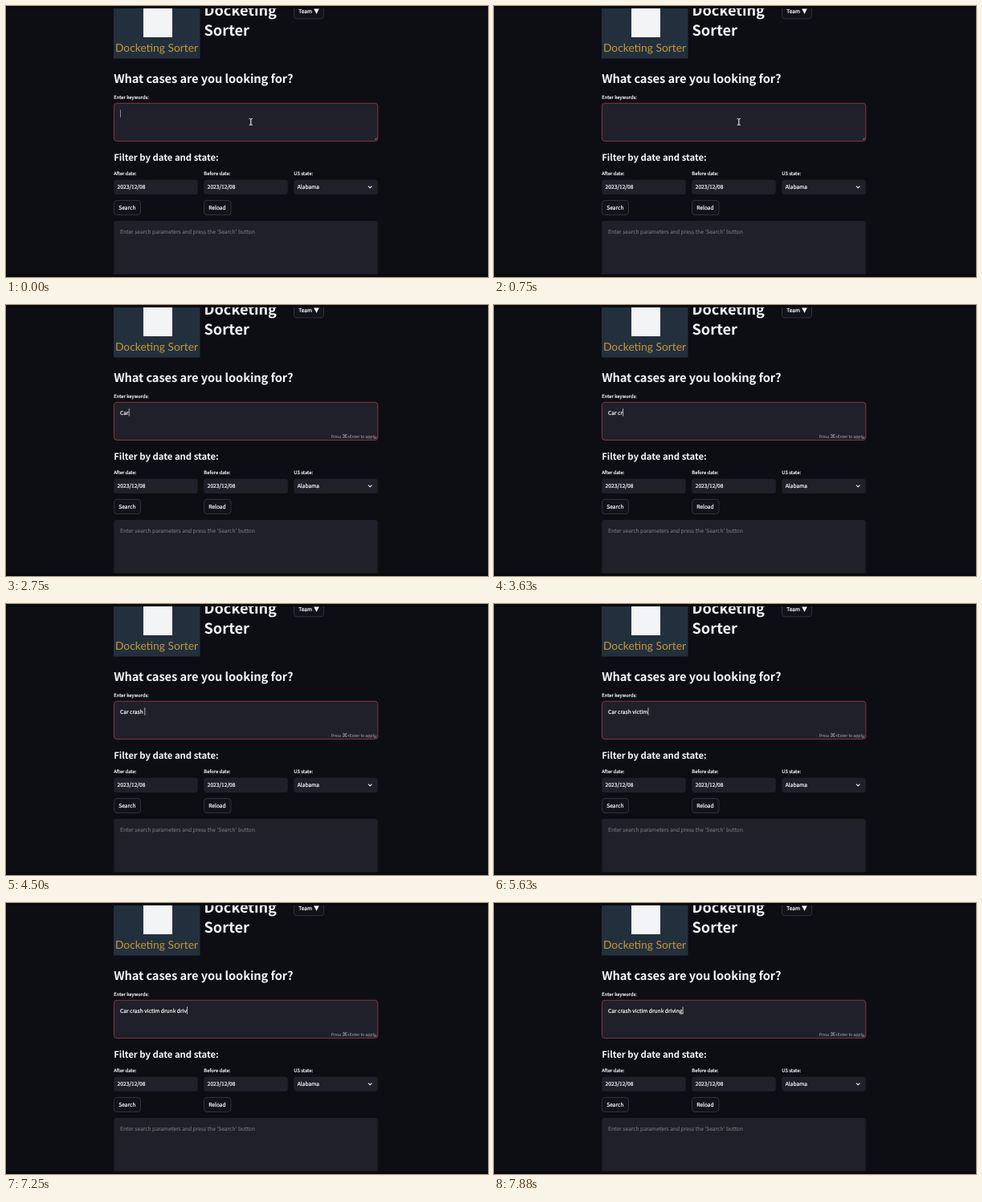
An HTML page with a canvas for the animation above (8000 ms loop, 600 px wide and 338 px high).

```html
<!DOCTYPE html>
<html lang="en">
<head>
<meta charset="utf-8">
<title>Case search</title>
<style>
  html, body { margin: 0; width: 100%; height: 100%; overflow: hidden; background: #0d0e14; }
  canvas { display: block; width: 600px; height: 338px; }
</style>
</head>
<body>
<canvas id="stage"></canvas>
<script>
const W = 600, H = 338, LOOP = 8000;
const SANS = '"Noto Sans CJK JP", "Noto Sans CJK SC", "Noto Sans CJK", "Open Sans", sans-serif';
const BG = '#0d0e14', FIELD = '#1f2029', INK = '#f4f5f7';
const QUERY = 'Car crash victim drunk driving';
// [time, characters typed]
const TYPING = [[2050, 0], [2700, 3.2], [4500, 10.3], [5630, 16.3], [6500, 22.3], [7600, 30]];

const canvas = document.getElementById('stage');
const ctx = canvas.getContext('2d');
const ratio = window.devicePixelRatio || 1;
canvas.width = W * ratio;
canvas.height = H * ratio;

function text(str, x, y, size, { color = INK, weight = 400, spacing = 0, align = 'left', family = SANS, heft = 0 } = {}) {
  ctx.font = `${weight} ${size}px ${family}`;
  ctx.letterSpacing = spacing + 'px';
  ctx.textRendering = 'geometricPrecision';
  ctx.textAlign = align;
  ctx.fillStyle = color;
  ctx.fillText(str, x, y);
  if (heft) {
    ctx.strokeStyle = color;
    ctx.lineWidth = heft;
    ctx.lineJoin = 'round';
    ctx.strokeText(str, x, y);
  }
  return ctx.measureText(str).width;
}

// Small interface text sits between regular and bold.
const label = (str, x, y, size = 6.67) => text(str, x, y, size, { heft: 0.22 });

function box(x, y, w, h, fill, stroke) {
  ctx.beginPath();
  ctx.roundRect(x, y, w, h, 3.5);
  ctx.fillStyle = fill;
  ctx.fill();
  if (stroke) {
    ctx.strokeStyle = stroke;
    ctx.lineWidth = 0.9;
    ctx.stroke();
  }
}

function line(color, width, ...points) {
  ctx.beginPath();
  points.forEach(([x, y], i) => i ? ctx.lineTo(x, y) : ctx.moveTo(x, y));
  ctx.strokeStyle = color;
  ctx.lineWidth = width;
  ctx.stroke();
}

function button(name, x, y, w) {
  box(x, y, w, 18, '#12131a', '#35363c');
  label(name, x + 5.7, y + 11.5);
}

function field(name, value, x) {
  label(name, x, 211.1, 5.85);
  box(x, 216.8, 104.5, 18.2, FIELD);
  label(value, x + 4.4, 228.1);
}

function header() {
  ctx.fillStyle = '#22303e';
  ctx.fillRect(134, 3, 107.5, 62.5);
  ctx.fillStyle = '#f3f4f5';
  ctx.fillRect(171, 3, 36, 36);
  text('Docketing Sorter', 187.5, 56.5, 13.8, { color: '#c9952f', align: 'center', family: 'Lato, "Open Sans", sans-serif' });

  const title = { weight: 700 };
  text('Docketing', 246.5, 12.2, 18.2, title);
  text('Sorter', 246.5, 37, 18.2, title);

  button('Team', 358.5, -2.2, 37);
  ctx.beginPath();
  ctx.moveTo(383.2, 3.6);
  ctx.lineTo(389.8, 3.6);
  ctx.lineTo(386.5, 10);
  ctx.fillStyle = INK;
  ctx.fill();
}

function filters() {
  text('Filter by date and state:', 134.2, 192.5, 11.4, { weight: 700, spacing: -0.05 });
  field('After date:', '2023/12/08', 134.2);
  field('Before date:', '2023/12/08', 246.3);
  field('US state:', 'Alabama', 358.3);
  line(INK, 1.1, [451, 224.7], [453.2, 226.9], [455.4, 224.7]);
  button('Search', 134.5, 242.5, 33);
  button('Reload', 246.5, 242.5, 33.5);
}

function results() {
  box(134.2, 268, 328.6, 80, FIELD);
  text("Enter search parameters and press the 'Search' button", 142, 283.8, 6.68, { color: '#74757c', heft: 0.1 });
}

function typedCount(t) {
  if (t < TYPING[0][0]) return 0;
  for (let i = 1; i < TYPING.length; i++) {
    const [t0, n0] = TYPING[i - 1], [t1, n1] = TYPING[i];
    if (t < t1) return Math.floor(n0 + (n1 - n0) * (t - t0) / (t1 - t0));
  }
  return QUERY.length;
}

function pointer(x, y) {
  const color = '#c9cace';
  line(color, 1.4, [x, y - 3.6], [x, y + 3.6]);
  for (const s of [-1, 1]) {
    line(color, 1.1, [x - 2.2, y + s * 4.1], [x, y + s * 3.4], [x + 2.2, y + s * 4.1]);
  }
}

function hint() {
  const grey = { color: '#96979d', heft: 0.1 };
  text('Press', 404.8, 166, 5, grey);
  text('⌘', 418.4, 166.3, 6.7, { color: '#a8a9ae', family: '"DejaVu Sans", sans-serif' });
  text('+Enter to apply', 425, 166, 5, grey);
}

function keywords(t) {
  text('What cases are you looking for?', 134.2, 96, 14.7, { weight: 700, spacing: -0.11 });
  label('Enter keywords:', 134.2, 116, 5.85);
  box(134.4, 121.3, 328.4, 47.3, FIELD, '#8f3c42');
  line('#96979d', 0.7, [458.8, 167], [461.5, 164.3]);
  line('#96979d', 0.7, [460.4, 167], [461.5, 165.9]);

  const n = typedCount(t);
  const width = n ? label(QUERY.slice(0, n), 142, 136.5) : 0;
  if (n || t % 1000 < 500) {
    ctx.fillStyle = n ? '#dcdde0' : '#a3a4a9';
    ctx.fillRect(142.2 + width, 129.3, 0.8, 9.4);
  }
  if (n) hint();
  else pointer(304.8, t < 1000 ? 144.5 : 144);
}

function draw(t) {
  ctx.setTransform(ratio, 0, 0, ratio, 0, 0);
  ctx.fillStyle = '#090a0e';
  ctx.fillRect(0, 0, W, H);
  ctx.save();
  ctx.beginPath();
  ctx.rect(0, 3, W, 331.5);
  ctx.clip();
  ctx.fillStyle = BG;
  ctx.fillRect(0, 0, W, H);
  header();
  keywords(t);
  filters();
  results();
  ctx.restore();
}

const start = performance.now();
function tick() {
  draw((performance.now() - start) % LOOP);
  requestAnimationFrame(tick);
}
tick();
</script>
</body>
</html>
```
